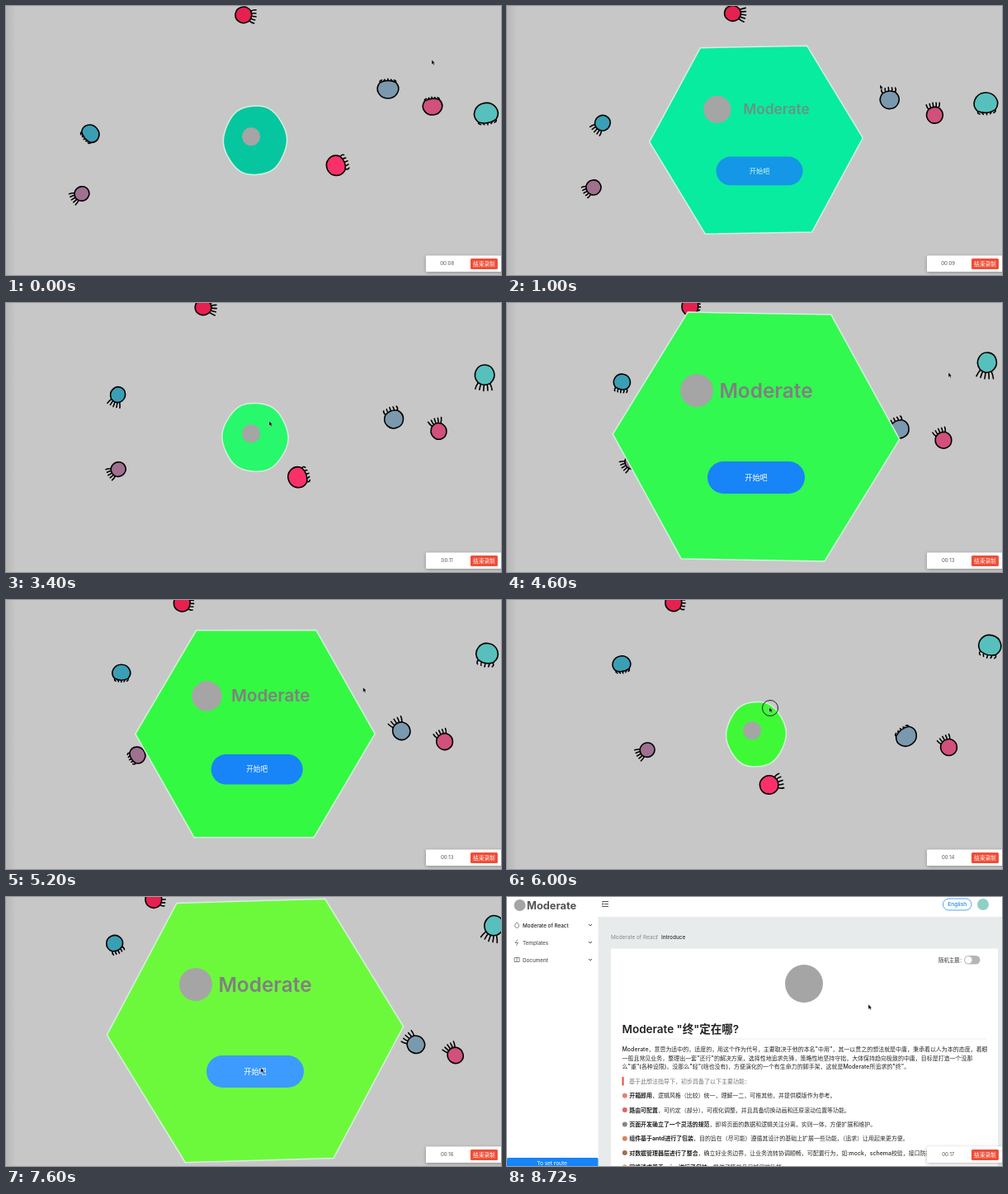
Recreate the animation shown at these times as an HTML page. Size 600 px wide and 326 px high, loop 8800 ms.

```html
<!DOCTYPE html>
<html lang="zh-CN">
<head>
<meta charset="utf-8">
<title>Moderate</title>
<style>
html, body { margin: 0; width: 100%; height: 100%; overflow: hidden; background: #c7c7c7; }
svg { display: block; width: 100vw; height: 100vh; }
text { font-family: Inter, "Noto Sans CJK SC", "Noto Sans CJK", sans-serif; white-space: pre; }
.mid { text-anchor: middle; }
.medium { font-weight: 500; }
.semi { font-weight: 600; }
.bold { font-weight: 700; }
</style>
</head>
<body>
<svg viewBox="0 0 600 326" preserveAspectRatio="none">
  <defs>
    <linearGradient id="edge">
      <stop stop-color="#b7b7b7"/><stop offset="1" stop-color="#c7c7c7"/>
    </linearGradient>
    <filter id="shadow" x="-10%" y="-40%" width="120%" height="180%">
      <feDropShadow dx="0" dy="1" stdDeviation="2" flood-opacity=".3"/>
    </filter>
  </defs>

  <g id="scene">
    <rect width="600" height="326" fill="#c7c7c7"/>
    <rect width="12" height="326" fill="url(#edge)"/>
    <g id="swimmers" stroke="#000" stroke-width="1.6" stroke-linecap="round" stroke-linejoin="round"></g>
    <path id="blob" stroke="#d5f0df" stroke-width="1.5" stroke-linejoin="round"/>
    <circle id="mark" fill="#a5a5a5"/>
    <g id="title"><text class="mid semi" y="8.7" font-size="24.4" fill="#808080">Moderate</text></g>
    <g id="button">
      <rect x="-59" y="-19.5" width="118" height="39" rx="19.5"/>
      <text class="mid medium" y="3.2" font-size="9.2" fill="#fff">开始吧</text>
    </g>
  </g>

  <g id="page">
    <rect width="600" height="326" fill="#e7ebec"/>
    <rect width="600" height="24" fill="#fff"/>
    <rect width="110.5" height="326" fill="#fff"/>
    <rect x="126" y="62.5" width="469" height="264" fill="#fff"/>
    <circle cx="15.5" cy="10" r="7" fill="#a5a5a5"/>
    <path d="M115 5.500h8M118 8.500h5M115 11.500h8M117 7.200l-2 1.300 2 1.300" fill="none" stroke="#444" stroke-width=".9"/>
    <rect x="528.5" y="2" width="34.5" height="14" rx="7" fill="#fff" stroke="#3d9bf5" stroke-width=".9"/>
    <circle cx="577" cy="9" r="7" fill="#8fcfc4"/>
    <g fill="none" stroke="#555" stroke-width=".7">
      <path d="M12 30.500q-5 5.500 0 7 5-1.500 0-7z"/>
      <path d="M13 51.500l-3 4h3.500l-2.500 3.500"/>
      <path d="M9 73.500h6v5h-6zM12 73.500v5"/>
      <path d="M99 33l2 2 2-2M99 54l2 2 2-2M99 75l2 2 2-2" stroke-width="1"/>
    </g>
    <rect y="316" width="110.5" height="12" rx="1.5" fill="#1784f8"/>
    <rect x="554" y="71" width="19.5" height="10.5" rx="5.25" fill="#b5b5b5"/>
    <circle cx="559.3" cy="76.25" r="4.3" fill="#fff"/>
    <circle cx="360" cy="105" r="23" fill="#a5a5a5"/>
    <path d="M140 172h441" stroke="#e6e6e6" stroke-width=".7"/>
    <rect x="139.5" y="218" width="2" height="10.5" fill="#e8483f"/>
    <g id="copy"></g>
  </g>

  <g filter="url(#shadow)"><rect x="509" y="302.5" width="95" height="19.5" rx="1" fill="#fff"/></g>
  <rect x="563" y="306" width="33" height="13" rx="1.5" fill="#f04e38"/>
  <text class="mid medium" x="579.5" y="314.9" font-size="6.6" fill="#fff">结束录制</text>
  <text id="clock" class="mid" x="534.7" y="314.2" font-size="6" fill="#555"></text>

  <g id="cursor">
    <circle id="ring" r="9.5" cy="-1" fill="none" stroke="#222"/>
    <path d="M-1-2v6l1.400-1.200 1 2 1-.5-.9-1.900h1.700z" fill="#000" stroke="#eee" stroke-width=".4"/>
  </g>
</svg>
<script>
const LOOP = 8800, PAGE_AT = 8120, DRIFT = 7600;
const $ = id => document.getElementById(id);
const clamp = v => Math.max(0, Math.min(1, v));
const ease = u => u * u * (3 - 2 * u);
const set = (node, attrs) => { for (const k in attrs) node.setAttribute(k, attrs[k]); };
const show = (id, visible) => { $(id).style.display = visible ? "" : "none"; };
function add(parent, tag, attrs, label = "") {
  const node = document.createElementNS("http://www.w3.org/2000/svg", tag);
  set(node, attrs);
  node.textContent = label;
  return parent.appendChild(node);
}

// Each swimmer drifts from one point to another, bowed sideways, and beats its tentacles.
const swimmers = [
  { fill: "#e6204f", r: 11, from: [289, 11], to: [180, 3], bow: [0, -2], beat: 800, phase: .3 },
  { fill: "#3a9fb5", r: 10.5, from: [102, 155], to: [132, 57], bow: [20, 1], beat: 747, phase: 0 },
  { fill: "#a0708f", r: 10, from: [91, 228], to: [190, 170], bow: [0, 0], beat: 1150, phase: .4 },
  { fill: "#7b99ae", r: 12, from: [463, 100], to: [496, 178], bow: [-8, 5], beat: 1200, phase: 0 },
  { fill: "#d1507c", r: 11, from: [517, 121], to: [544, 191], bow: [-5, 2], beat: 1400, phase: 0 },
  { fill: "#57c0bd", r: 13.5, from: [582, 131], to: [591, 36], bow: [-6, 0], beat: 1015, phase: 0 },
  { fill: "#fb3068", r: 12.5, from: [401, 193], to: [297, 231], bow: [0, 1], beat: 1900, phase: .13 }
];
for (const s of swimmers) {
  s.group = add($("swimmers"), "g", {});
  s.legs = add(s.group, "path", { fill: "none" });
  s.body = add(s.group, "path", { fill: s.fill });
}
function drawSwimmer({ r, from, to, bow, beat, phase, group, legs, body }, t) {
  const u = t / DRIFT;
  const [x, y] = from.map((v, i) => v + (to[i] - v) * u + bow[i] * 4 * u * (1 - u));
  const [vx, vy] = from.map((v, i) => to[i] - v + bow[i] * 4 * (1 - 2 * u));
  const heading = Math.atan2(vy, vx) * 180 / Math.PI + 90;
  const spread = Math.abs(Math.sin(Math.PI * (t / beat + phase)));
  const w = r * (1.05 - .17 * spread), base = w * (.78 - .16 * spread), low = .6 * r;
  set(group, { transform: `translate(${x} ${y}) rotate(${heading})` });
  set(body, { d: `M${-base} ${low}C${-w * 1.35} ${-.1 * r} ${-w * .8} ${-r} 0 ${-r}S${w * 1.35} ${-.1 * r} ${base} ${low}Q0 ${r} ${-base} ${low}Z` });
  let d = "";
  for (let i = -2; i <= 2; i++) {
    const rootX = i * base * .45, rootY = (.75 - Math.abs(i) * .06) * r;
    const tipX = rootX + i * r * (.2 * spread - .06), tipY = rootY + r * (.22 + .4 * spread);
    d += `M${rootX} ${rootY}Q${rootX + i * .1 * r} ${(rootY + tipY) / 2} ${tipX} ${tipY}`;
  }
  set(legs, { d });
}

// The blob is a hexagon that wobbles, and softens into a round shape when small.
const opens = [590, 3500, 6150], closes = [1720, 5000], SWELL = 700;
function blobScale(t) {
  const done = starts => starts.reduce((sum, s) => sum + ease(clamp((t - s) / SWELL)), 0);
  return .22 + .78 * (done(opens) - done(closes));
}
function closedCurve(points, bend) {
  const n = points.length, p = i => points[(i + n) % n];
  let d = "M" + p(0);
  for (let i = 0; i < n; i++) {
    const [a, b, c, e] = [p(i - 1), p(i), p(i + 1), p(i + 2)];
    const out = b.map((v, j) => v + (c[j] - a[j]) * bend / 6);
    const into = c.map((v, j) => v - (e[j] - b[j]) * bend / 6);
    d += `C${out} ${into} ${c}`;
  }
  return d + "Z";
}
function drawBlob(t) {
  const k = blobScale(t), s = t / 1000, radius = 178 * k;
  const bend = clamp((.65 - k) / .2), wobble = radius * (.035 + .04 * bend);
  const sixth = Math.PI / 3, lead = 3.7 - .85 * s;
  const corners = Array.from({ length: 6 }, (_, i) => {
    const angle = (i - 2) * sixth;
    return [
      302 + radius * Math.cos(angle) + wobble * Math.cos(sixth * (i - lead)),
      163 - k + radius * Math.sin(angle) * (1 + .08 * bend) + wobble * Math.cos(sixth * (i - lead - 1.2))
    ];
  });
  set($("blob"), {
    d: closedCurve(corners, bend),
    fill: `hsl(${168 - 8.4 * s} 94% ${40 + 21 * (1 - Math.exp(-s / 2.2))}%)`
  });

  const shrink = 1 - k, opacity = clamp((k - .42) / .36);
  set($("mark"), { cx: 230 + 86 * shrink, cy: 106 + 67 * shrink, r: 20 * (1 - .58 * shrink) });
  set($("title"), { opacity, transform: `translate(${314 + 43 * shrink} ${106 + 65 * shrink}) scale(${k})` });
  set($("button"), {
    opacity, fill: t > 7300 ? "#3d9bff" : "#1784f8",
    transform: `translate(${302 + 14 * shrink} ${211.5 - 40 * shrink}) scale(${1 - .38 * shrink})`
  });
}

// Pointer stops: time, x, y.
const stops = [
  [0, 517, 67], [550, 335, 140], [1000, 453, 97], [2200, 358, 113], [3400, 320, 145],
  [4600, 536, 86], [5850, 319, 132], [6100, 319, 132], [7400, 310, 209],
  [PAGE_AT, 310, 209], [8700, 439, 132], [LOOP, 439, 132]
];
function drawPointer(t) {
  const next = stops.findIndex(stop => stop[0] > t);
  const [t0, x0, y0] = stops[next - 1], [t1, x1, y1] = stops[next];
  const u = ease((t - t0) / (t1 - t0));
  set($("cursor"), { transform: `translate(${x0 + (x1 - x0) * u} ${y0 + (y1 - y0) * u})` });
  show("ring", t > 5880 && t < 6120);
}

const write = (x, y, size, fill, label, cls = "") =>
  add($("copy"), "text", { x, y, "font-size": size, fill, class: cls }, label);

write(24, 14.7, 12.8, "#555", "Moderate", "bold");
write(545.8, 11.3, 6.6, "#1784f8", "English", "mid medium");
write(54.5, 325, 6.5, "#fff", "To set route", "mid");
write(126, 51.3, 6.45, "#888", "Moderate of React");
write(180.5, 51.3, 6.45, "#888", "/");
write(187, 51.3, 6.4, "#333", "Introduce", "medium");
write(523, 78.6, 6.4, "#333", "随机主题：");
write(139.5, 164.8, 13.5, "#222", 'Moderate "终"定在哪?', "semi");
write(148, 225.6, 7, "#777", "基于此想法指导下，初步具备了以下主要功能：");

["Moderate of React", "Templates", "Document"].forEach((label, i) =>
  write(19, 36.5 + 21 * i, 6.3, i ? "#555" : "#222", label, "medium"));

[
  'Moderate，意思为适中的，适度的，用这个作为代号，主要取决于他的本名"中用"，其一以贯之的想法就是中庸，秉承着以人为本的态度，着眼',
  '一般且常见业务，整理出一套"还行"的解决方案，选择性地追求先锋，策略性地坚持守拙，大体保持趋向极致的中庸，目标是打造一个没那',
  '么"重"(各种设限)，没那么"轻"(啥也没有)，方便演化的一个有生命力的脚手架，这就是Moderate所追求的"终"。'
].forEach((label, i) => write(139.5, 187.3 + 10.5 * i, 6.98, "#2a2a2a", label, "medium"));

[
  ["#e88070", "开箱即用", "，逻辑风格（比较）统一，理解一二，可推其他，并提供模版作为参考。"],
  ["#d9685f", "路由可配置", "，可约定（部分），可视化调整，并且具备切换动画和还原滚动位置等功能。"],
  ["#8a8580", "页面开发确立了一个灵活的规范", "，即将页面的数据和逻辑关注分离，实则一体，方便扩展和维护。"],
  ["#d98268", "组件基于antd进行了包装", "，目的旨在（尽可能）遵循其设计的基础上扩展一些功能，（追求）让用起来更方便。"],
  ["#a86b4d", "对数据管理器层进行了整合", "，确立好业务边界，让业务流转协调顺畅，可配置行为，如:mock，schema校验，接口防抖"],
  ["#d6a55a", "网络请求基于axios进行了包装", "，提供了简单且足够用的功能。"]
].forEach(([fill, strong, rest], i) => {
  const y = 243.4 + 17.3 * i;
  add($("copy"), "circle", { cx: 142.8, cy: y - 2.6, r: 3, fill });
  const line = write(148.2, y, 6.96, "#2a2a2a", "", "medium");
  add(line, "tspan", { class: "bold", fill: "#222" }, strong);
  add(line, "tspan", {}, rest);
});

function frame() {
  const t = performance.now() % LOOP, onPage = t >= PAGE_AT;
  show("scene", !onPage);
  show("page", onPage);
  if (!onPage) {
    swimmers.forEach(s => drawSwimmer(s, t));
    drawBlob(t);
  }
  drawPointer(t);
  $("clock").textContent = "00:" + String(8 + Math.floor(t / 1000 + .5)).padStart(2, "0");
  requestAnimationFrame(frame);
}
frame();
</script>
</body>
</html>
```
